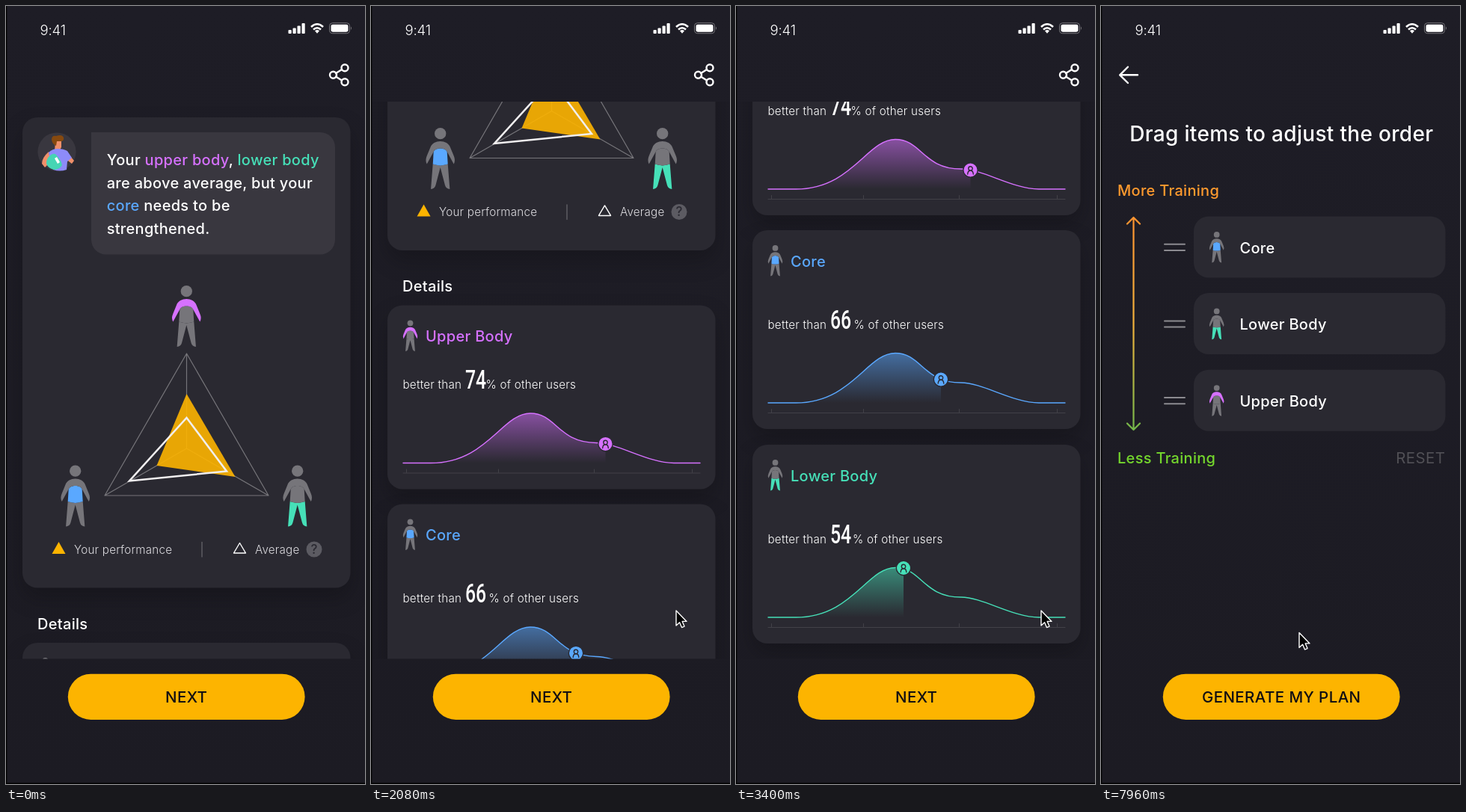
An HTML page that plays this animation: 480x1041 px, repeating every 8 s.

```html
<!DOCTYPE html>
<html lang="en">
<head>
<meta charset="utf-8">
<title>Training plan</title>
<style>
html, body { margin: 0; width: 100%; height: 100%; overflow: hidden; background: #1c1b22; }
svg { display: block; width: 100vw; height: 100vh; }
text { font: 540 20px Inter, sans-serif; letter-spacing: .015em; fill: #fff; white-space: pre; }
.small { font-size: 15.2px; font-weight: 350; }
.title { font-size: 28px; letter-spacing: .011em; }
.label { font-size: 20.5px; letter-spacing: .02em; fill: #100e12; }
.mid { text-anchor: middle; }
.line { fill: none; stroke: #fff; stroke-linecap: round; stroke-linejoin: round; }
/* condensed numerals */
.num { font: 500 35px Roboto, sans-serif; letter-spacing: 0; transform: scaleX(.71); }
.card { fill: #2a2931; filter: drop-shadow(0 14px 14px rgba(0, 0, 0, .2)); }
</style>
</head>
<body>
<svg id="stage" viewBox="0 0 480 1041" preserveAspectRatio="none"></svg>
<script>
const PINK = '#d671ff', BLUE = '#5aa8ff', GREEN = '#46e0b8', GOLD = '#fdb400', GREY = '#76757a', CARD = '#2a2931';
const LOOP = 8000;

const text = (x, y, s, attrs = '') => `<text x="${x}" y="${y}" ${attrs}>${s}</text>`;
const line = (d, width, attrs = '') => `<path class="line" d="${d}" stroke-width="${width}" ${attrs}/>`;
const card = (x, y, w, h) => `<rect class="card" x="${x}" y="${y}" width="${w}" height="${h}" rx="20"/>`;
const tint = (s, color) => `<tspan fill="${color}">${s}</tspan>`;
const button = label => `<rect x="82.8" y="893.7" width="316.8" height="61.2" rx="30.6" fill="${GOLD}"/>`
  + text(241.2, 932.3, label, 'class="mid label"');

// Body figure: 246 units tall, centred on x, with one part coloured.
function figure(x, y, scale, part, color) {
  const fill = name => name === part ? color : GREY;
  return `<g transform="translate(${x} ${y}) scale(${scale})">
    <circle cy="23" r="23" fill="${GREY}"/>
    <path fill="${fill('legs')}" d="M-30 146Q0 157 30 146L38 246Q23 245 19 231L0 159L-19 231Q-23 245 -38 246Z"/>
    <path fill="${fill('core')}" d="M-27 96C-20 78 20 78 27 96L30 146Q0 157 -30 146Z"/>
    <path fill="${fill('arms')}" d="M-54 146Q-62 131 -54 113L-40 79C-29 46 29 46 40 79L54 113Q62 131 54 146L27 96C20 78 -20 78 -27 96Z"/>
  </g>`;
}

const avatar = `<circle cx="68" cy="195" r="25.6" fill="#39373f"/>
  <path fill="#f0906a" d="M66 181h8v8l-3 5h-6zM57 195q-9 8-9 16l4 5 8-8zM82 196l9 11-3 4-9-7z"/>
  <path fill="#8d8bfa" d="M57 196q5-5 12-5 8 0 13 3l6 9-6 5-1 11q-9 3-18 0l-4-12z"/>
  <path fill="#86490f" d="M61 179q0-6 6-5 8-3 10 2 1 5-4 5l-5 0-1 6q-5-2-6-8z"/>
  <path fill="#46d5b4" d="M56 203q5-6 10-5 8 8 9 15-4 6-11 6-8-2-10-8 0-5 2-8z"/>
  <path fill="#fff" d="M65 204l3-2 4 7-3 2z"/>`;

function bubble(bottom, lines) {
  return `<path fill="#39373f" d="M114 169H420a20 20 0 0 1 20 20V${bottom - 20}a20 20 0 0 1-20 20H134a20 20 0 0 1-20-20Z"/>`
    + avatar + lines.map((s, i) => text(134.7, 213 + i * 30.7, s)).join('');
}

const radar = line('M241.5 465L132 655H351ZM241.5 592V465M241.5 592L132 655M241.5 592L351 655', 1.2, `style="stroke:${GREY}"`)
  + `<path fill="${GOLD}" fill-opacity=".9" d="M241.5 519L306.5 630L201.5 615Z"/>`
  + line('M241.5 551L295 622.5L165 635.5Z', 2.5, 'style="stroke-linejoin:miter;stroke:#f1eff0"');

const legend = `<path fill="${GOLD}" d="M70.5 717L79.5 733H61.5Z"/>`
  + text(91, 732.5, 'Your performance', 'class="small" style="fill:#dddce0"')
  + line('M262 717.5V737', 1.3, 'style="stroke:#66656b"')
  + line('M312.5 718.5L320.5 732H304.5Z', 1.4)
  + text(333, 732.5, 'Average', 'class="small" style="fill:#dddce0"')
  + '<circle cx="412" cy="727" r="10.5" fill="#5c5b62"/>'
  + text(412, 733, '?', `class="mid" style="font-size:17px;fill:${CARD}"`);

// One result card with its distribution curve; the fill ends at the marker.
function detail(top, height, part, title, color, percent, percentEnd, markerX, markerY) {
  const curve = 'M43 0H80C155 0 175-66.5 213-66.5C248-66.5 250-27 301-27C330-27 370 0 405 0H440';
  const base = top + height - 35, row = top + height - 134;
  return card(22, top, 438.5, height)
    + figure(52.5, top + 20, .169, part, color)
    + text(73, top + 49, title, `style="fill:${color}"`)
    + text(42.5, row, 'better than', 'class="small"')
    + `<g transform="translate(126 ${row})">${text(0, 0, percent, 'class="num"')}</g>`
    + text(percentEnd, row, '% of other users', 'class="small"')
    + `<g transform="translate(0 ${base})">
      <linearGradient id="fade-${part}" x2="0" y2="1">
        <stop stop-color="${color}" stop-opacity=".54"/><stop offset="1" stop-color="${color}" stop-opacity="0"/>
      </linearGradient>
      <clipPath id="cut-${part}"><rect x="43" y="-70" width="${markerX - 43}" height="72"/></clipPath>
      <path d="${curve}" fill="url(#fade-${part})" clip-path="url(#cut-${part})"/>
      ${line(curve, 1.4, `style="stroke:${color}"`)}
      ${line('M43 13.5H440M47.5 13V8.5M170.5 13V8.5M298.5 13V8.5M429.5 13V8.5', 1, 'style="stroke:#424148"')}
      <g transform="translate(${markerX} ${markerY})">
        <circle r="9.7" fill="${color}" stroke="${CARD}" stroke-width="1.4"/>
        <g class="line" style="stroke:${CARD}" stroke-width="1.4"><circle cy="-2" r="2.7"/><path d="M-3.8 5.5Q-3.5 .8 0 .8Q3.5 .8 3.8 5.5"/></g>
      </g></g>`;
}

const share = line('M449 85L441 90M441 94.5L449 99.5', 2.4)
  + [[453, 82.8], [437.5, 92.3], [453, 101.8]].map(([x, y]) =>
    `<circle class="line" cx="${x}" cy="${y}" r="4.5" stroke-width="2.4"/>`).join('');
const back = line('M49 92.3H25.5M36 81.5L25.2 92.3L36 103', 2.4);

const results = `<g clip-path="url(#viewport)"><g id="list">`
  + card(22, 149, 438.5, 629.5)
  + bubble(332.5, [
    `Your ${tint('upper body', PINK)}, ${tint('lower body', GREEN)}`,
    'are above average, but your', `${tint('core', BLUE)} needs to be`, 'strengthened.'])
  + figure(241.3, 374, .333, 'arms', PINK)
  + figure(92.7, 614.5, .333, 'core', BLUE)
  + figure(389.7, 614.5, .333, 'legs', GREEN)
  + radar + legend
  + text(42, 833.5, 'Details')
  + detail(852, 246, 'arms', 'Upper Body', PINK, 74, 153.5, 313.5, -25.5)
  + detail(1118, 266, 'core', 'Core', BLUE, 66, 157.5, 274, -31.5)
  + detail(1405, 266, 'legs', 'Lower Body', GREEN, 54, 156, 224, -66)
  + `</g></g>` + share + button('NEXT');

const advice = back + card(22, 149, 438.5, 563)
  + bubble(384, [
    `Your ${tint('core', BLUE)} is weakest of the`,
    'three parts, we will', 'specifically arrange more', 'training for this part.'])
  + text(134.7, 338, 'You can also manually adjust the', 'class="small" style="fill:#b8b7bb"')
  + text(134.7, 358.5, 'priority of training part', 'class="small" style="fill:#b8b7bb"')
  + figure(241.3, 425, 1, 'core', BLUE)
  + text(243.5, 845, 'Adjust', `class="mid" style="fill:${GOLD}"`)
  + button('GENERATE MY PLAN');

const rows = [['core', 'Core', BLUE], ['legs', 'Lower Body', GREEN], ['arms', 'Upper Body', PINK]];
const order = back
  + text(241.3, 180.5, 'Drag items to adjust the order', 'class="mid title"')
  + text(22, 253.5, 'More Training', 'style="fill:#ff9a2e"')
  + text(22, 612, 'Less Training', 'style="fill:#74d62d"')
  + text(460.5, 612, 'RESET', 'class="label" text-anchor="end" style="fill:#515056;font-weight:400"')
  + line('M43.5 283V567M35 291.5L43.5 283L52 291.5M35 558.5L43.5 567L52 558.5', 2.2, 'style="stroke:url(#rank)"')
  + rows.map(([part, name, color], i) => {
    const y = 281.5 + i * 102.6;
    return `<rect x="124" y="${y}" width="336.5" height="82" rx="20" fill="${CARD}"/>`
      + line(`M85 ${y + 37.3}H112M85 ${y + 45.5}H112`, 2, 'style="stroke:#8c8b90"')
      + figure(154.7, y + 20.5, .169, part, color) + text(185.5, y + 49, name);
  }).join('')
  + button('GENERATE MY PLAN');

const status = text(45.5, 39, '9:41', 'style="font-size:18.5px;font-weight:300;letter-spacing:-.01em"')
  + [5, 7.5, 10.5, 14].map((h, i) => `<rect x="${377.5 + i * 6}" y="${37 - h}" width="4.2" height="${h}" rx="1" fill="#fff"/>`).join('')
  + line('M408 28Q416 20.5 424 28M411 31.5Q416 27 421 31.5', 2.6, 'style="stroke-linecap:butt"')
  + '<path fill="#fff" d="M413 33.2Q416 31 419 33.2L416 36.8Z"/>'
  + '<rect x="432.5" y="22.7" width="27" height="14" rx="4" fill="none" stroke="#77767b"/>'
  + '<rect x="434.5" y="24.7" width="23" height="10" rx="2.4" fill="#fff"/>'
  + '<path fill="#77767b" d="M461 27.5q2 2.2 0 4.5z"/>';

const stage = document.getElementById('stage');
stage.innerHTML = `<defs>
    <linearGradient id="bg" x2="0" y2="1"><stop stop-color="#1e1d26"/><stop offset="1" stop-color="#1c1b23"/></linearGradient>
    <linearGradient id="rank" gradientUnits="userSpaceOnUse" x1="0" y1="283" x2="0" y2="567">
      <stop stop-color="#ff9430"/><stop offset=".5" stop-color="#f2b23c"/><stop offset="1" stop-color="#74b84a"/>
    </linearGradient>
    <clipPath id="viewport"><rect y="128" width="480" height="745.5"/></clipPath>
  </defs>
  <rect width="480" height="1041" fill="url(#bg)"/>
  ${status}
  ${[results, advice, order].map(page => `<g class="page">${page}</g>`).join('')}
  <path d="M0 0H1.3V1039.6H480V1041H0Z"/>
  <path id="cursor" d="M0 0V20L4.6 15.8L7.5 22.6L11 21.1L8.2 14.4H14Z" stroke="#fff" stroke-width="1.4" stroke-linejoin="round"/>`;

const pages = stage.querySelectorAll('.page');
const list = document.getElementById('list');
const cursor = document.getElementById('cursor');

// Smooth curve through [time, value] keys that rests on flat stretches.
function track(keys, t) {
  const last = keys.length - 1;
  if (t <= keys[0][0]) return keys[0][1];
  if (t >= keys[last][0]) return keys[last][1];
  const i = keys.findIndex(key => key[0] > t) - 1;
  const slope = k => {
    if (k === 0 || k === last) return 0;
    const [[t0, v0], [, v1], [t2, v2]] = keys.slice(k - 1, k + 2);
    return v0 === v1 || v1 === v2 ? 0 : (v2 - v0) / (t2 - t0);
  };
  const [ta, a] = keys[i], [tb, b] = keys[i + 1];
  const d = tb - ta, u = (t - ta) / d, w = 1 - u;
  return a * w * w * (1 + 2 * u) + b * u * u * (3 - 2 * u) + d * u * w * (slope(i) * w - slope(i + 1) * u);
}

const SCROLL = [[1300, 0], [1800, 277], [2320, 602], [2600, 766], [2820, 818]];
const CURSOR_X = [[250, 486], [820, 408], [3450, 408], [4150, 331.5], [6050, 331.5], [6360, 303.5], [6700, 265]];
const CURSOR_Y = [[250, 860], [820, 809], [3450, 809], [4150, 926.5], [6050, 926.5], [6360, 885.5], [6700, 838.5]];

function draw(now) {
  const t = now % LOOP;
  const current = t < 4280 ? 0 : t < 6800 ? 1 : 2;
  pages.forEach((page, i) => page.setAttribute('display', i === current ? 'inline' : 'none'));
  list.setAttribute('transform', `translate(0 ${-track(SCROLL, t)})`);
  cursor.setAttribute('transform', `translate(${track(CURSOR_X, t)} ${track(CURSOR_Y, t)})`);
  requestAnimationFrame(draw);
}
draw(0);
</script>
</body>
</html>
```
